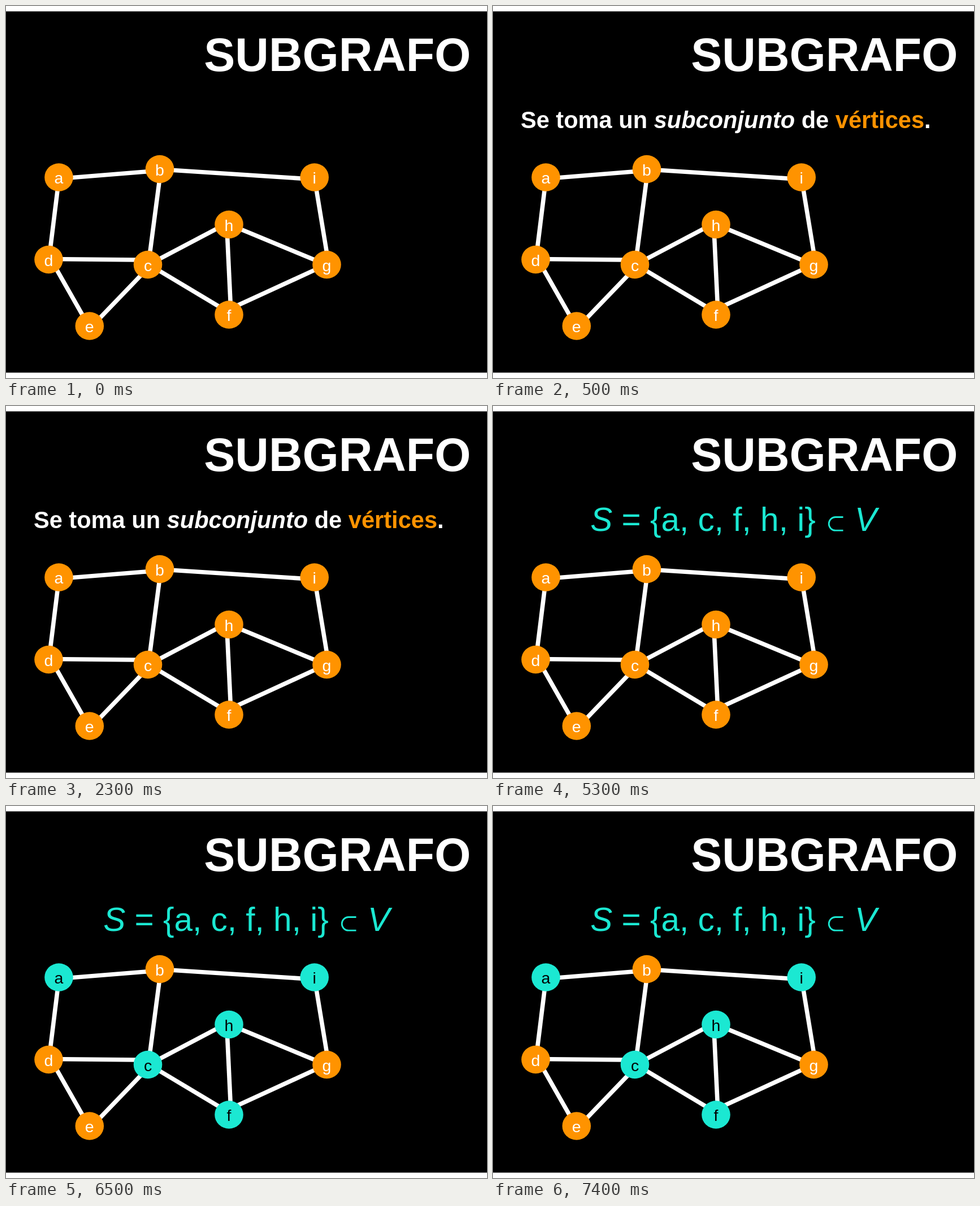
An HTML page that plays this animation: 851x658 px, repeating every 8000 ms.

```html
<!DOCTYPE html>
<html lang="es">
<head>
<meta charset="utf-8">
<title>Subgrafo</title>
<style>
  html, body { margin: 0; width: 100%; height: 100%; overflow: hidden; background: #fff; }
  svg { display: block; width: 851px; height: 658px; }
  text { font-family: "Liberation Sans", Arial, sans-serif; font-kerning: none; white-space: pre; }
  .bold { font-weight: bold; fill: #fff; }
  .title { font-size: 82.5px; }
  .phrase { font-size: 41.6px; }
  .accent { fill: #ff9300; }
  .formula { font-size: 58.5px; fill: #1be8d2; }
  .italic { font-style: italic; }
  .label { font-size: 28.5px; text-anchor: middle; fill: #fff; }
  #edges { stroke: #fff; stroke-width: 7.6; stroke-linecap: square; }
</style>
</head>
<body>
<svg viewBox="0 0 851 658">
  <rect y="9.5" width="851" height="639"/>
  <text class="bold title" x="350.3" y="115.3">SUBGRAFO</text>
  <text id="phrase" class="bold phrase" x="48.9" y="216.3" opacity="0">Se toma un <tspan class="italic">subconjunto</tspan> de <tspan class="accent">vértices</tspan>.</text>
  <g id="formula" class="formula" opacity="0">
    <text x="172.3" y="221.3"><tspan class="italic">S</tspan> = {a, c, f, h, i}</text>
    <path d="M619.5 196.5H606a11.8 11.8 0 0 0 0 23.6H619.5" fill="none" stroke="#1be8d2" stroke-width="2.8"/>
    <text class="italic" x="640" y="221.3">V</text>
  </g>
  <g id="edges"></g>
  <g id="nodes"></g>
</svg>
<script>
const LOOP = 8000;
const ORANGE = '#ff9300', TEAL = '#1be8d2';
const SUBSET = 'acfhi';

const nodes = {
  a: [93.5, 303], b: [272, 288.5], i: [545.7, 303],
  h: [394.5, 386.5], d: [75.5, 448.5], c: [251, 457.5],
  g: [567.5, 457.5], f: [394.5, 546], e: [147.8, 566]
};

// Visible ends of each edge: x1, y1, x2, y2
const edges = [
  [118, 303.5, 247, 293], [297, 290.5, 521, 305],
  [91, 327, 79, 424], [271, 312, 255, 434],
  [549.5, 327, 567, 433], [100, 447.8, 226, 449],
  [90, 467, 135, 546], [167, 551, 238, 477],
  [272, 447, 373, 394], [274, 470, 376, 531],
  [391.7, 410, 397, 522], [418, 396, 546, 449],
  [411, 529, 546, 467]
];

const byId = id => document.getElementById(id);

function add(parent, tag, attrs, text = '') {
  const el = document.createElementNS('http://www.w3.org/2000/svg', tag);
  for (const key in attrs) el.setAttribute(key, attrs[key]);
  el.textContent = text;
  parent.append(el);
  return el;
}

// steps: [time in ms, value], each held until the next one
function hold(el, prop, steps) {
  const frames = steps.map(([t, v]) => ({ offset: t / LOOP, [prop]: v, easing: 'step-end' }));
  frames.push({ offset: 1, [prop]: steps[steps.length - 1][1] });
  const anim = el.animate(frames, { duration: LOOP, iterations: Infinity });
  anim.startTime = 0;
}

for (const [x1, y1, x2, y2] of edges) add(byId('edges'), 'line', { x1, y1, x2, y2 });

for (const [name, [x, y]] of Object.entries(nodes)) {
  const disc = add(byId('nodes'), 'ellipse', { cx: x, cy: y, rx: 25.3, ry: 24.7, fill: ORANGE });
  const label = add(byId('nodes'), 'text', { x, y: y + 11.3, class: 'label' }, name);
  if (SUBSET.includes(name)) {
    hold(disc, 'fill', [[0, ORANGE], [6500, TEAL]]);
    hold(label, 'fill', [[0, '#fff'], [6500, '#000']]);
  }
}

hold(byId('phrase'), 'opacity', [[0, 0], [500, 1], [3500, 0]]);
hold(byId('formula'), 'opacity', [[0, 0], [3500, 1]]);
</script>
</body>
</html>
```
